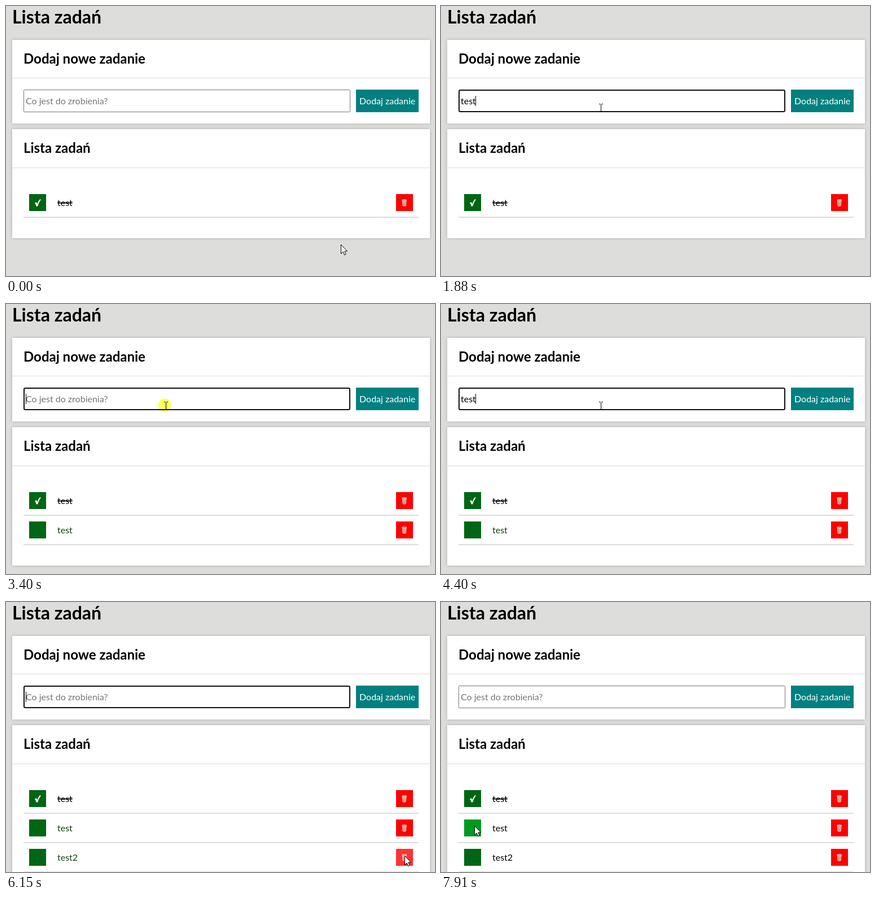
An HTML page that plays this animation: 760x478 px, repeating every 8 s.

```html
<!DOCTYPE html>
<html lang="pl">
<head>
<meta charset="utf-8">
<title>Lista zadań</title>
<style>
  html, body { margin: 0; width: 100%; height: 100%; overflow: hidden; background: #dddddc; }
  svg { display: block; width: 760px; height: 478px; font: 16px Lato, sans-serif; }
  .card { fill: #fff; filter: drop-shadow(0 0 2.5px #aaa); }
  .rule { fill: #ddd; }
  h1, .h1 { font-size: 32px; font-weight: 700; }
  .h2 { font-size: 24px; font-weight: 700; }
  .done { text-decoration: line-through; }
  #glow { mix-blend-mode: multiply; }
</style>
</head>
<body>
<svg viewBox="0 0 760 478">
  <defs>
    <path id="check" d="M51 348.6 L54.1 347.2 L55.3 350.2 Q57.3 344.8 60 342.3 L62 342.6 Q58.2 347.5 56.1 354.4 L53.7 354.6 Q52.7 350.8 51 348.6Z" fill="#fff"/>
    <g id="bin">
      <path d="M701.6 344 L709.6 344 L708.8 354 Q705.6 355.6 702.6 354Z" fill="#e3bcac"/>
      <ellipse cx="705.6" cy="343.6" rx="4.3" ry="1.5" fill="#f0d9c8"/>
      <path d="M702.8 343.7H708.4M704.1 346.5L704.5 353.5M707.2 346.5L706.8 353.5" stroke="#a85a4c" stroke-width=".8" fill="none"/>
    </g>
  </defs>
  <rect width="760" height="478" fill="#dddddc"/>
  <text class="h1" x="11" y="31">Lista zadań</text>
  <rect class="card" x="11" y="60" width="740" height="148"/>
  <text class="h2" x="31" y="102">Dodaj nowe zadanie</text>
  <rect class="rule" x="11" y="127" width="740" height="1"/>
  <rect id="field" fill="#fff"/>
  <text id="value" x="35" y="174"></text>
  <rect id="caret" y="159" width="1" height="18"/>
  <rect x="620" y="148" width="111" height="40" fill="#008080"/>
  <text x="626" y="174" fill="#fff">Dodaj zadanie</text>
  <rect id="list" class="card" x="11" y="218" width="740"/>
  <text class="h2" x="31" y="260">Lista zadań</text>
  <rect class="rule" x="11" y="286" width="740" height="1"/>
  <g id="rows"></g>
  <circle id="glow" r="11.5" fill="#ffff5c"/>
  <path id="arrow" d="M.5 .5V16.5L4.2 13L6.6 18.6L9.2 17.5L6.8 12H11.6Z" fill="#fff" stroke="#000"/>
  <path id="beam" d="M-3 -6.5H-.5M1.5 -6.5H4M.5 -6V6M-3 7.5H-.5M1.5 7.5H4M.5 6V7" fill="none" stroke="#000"/>
</svg>
<script>
const LOOP = 8000;
const $ = id => document.getElementById(id);
const set = (el, attrs) => { for (const k in attrs) el.setAttribute(k, attrs[k]); };
const show = (el, on) => set(el, { visibility: on ? 'visible' : 'hidden' });

// [start, x, y]: pointer position, held until the next step
const pointer = [
  [0, 593, 422], [130, 558, 380], [250, 430, 275], [370, 305, 192], [500, 283, 180],
  [5660, 345, 222], [5780, 550, 370], [5900, 672, 458], [6150, 706, 449],
  [6270, 426, 397], [6410, 260, 398], [6530, 150, 394], [6660, 88, 389],
  [6790, 71, 390], [6900, 59, 396]
];
// [start, typed text]
const typing = [
  [0, ''], [1500, 'te'], [1750, 'tes'], [1880, 'test'], [2260, ''],
  [3900, 't'], [4030, 'te'], [4150, 'tes'], [4400, 'test'], [4650, 'test2'], [5030, '']
];
const caretOff = [[1250, 1500], [2370, 2870], [5280, 5780], [6270, 6790]];
const clicks = [[500, 750], [3400, 3520], [7040, 7150], [7780, 7910]];
const tasks = [['test', 0], ['test', 2260], ['test2', 5030]];

const within = (t, spans) => spans.some(([a, b]) => t >= a && t < b);
const at = (t, steps) => steps.filter(s => s[0] <= t).pop();
const inside = (x, y, left, top, w, h) => x >= left && x < left + w && y >= top && y < top + h;

$('rows').innerHTML = tasks.map(([name], i) => `
  <g transform="translate(0 ${i * 52})">
    <rect class="box" x="41" y="333" width="30" height="30"/>
    <use class="tick" href="#check"/>
    <text class="name" x="91" y="354">${name}</text>
    <rect class="del" x="691" y="333" width="30" height="30"/>
    <use href="#bin"/>
    <rect class="rule" x="31" y="373" width="700" height="2"/>
  </g>`).join('');

const rows = [...$('rows').children].map(g => ({
  g, box: g.querySelector('.box'), tick: g.querySelector('.tick'),
  name: g.querySelector('.name'), del: g.querySelector('.del')
}));

function drawField(t) {
  const focus = t >= 500 && t < 7040;
  const text = at(t, typing)[1];
  const w = focus ? 2 : 1;
  set($('field'), {
    x: 31 + w / 2, y: 148 + w / 2, width: 579 - w, height: 40 - w,
    rx: focus ? 2 : 1, stroke: focus ? '#101010' : '#767676', 'stroke-width': w
  });
  $('value').textContent = text || 'Co jest do zrobienia?';
  set($('value'), { fill: text ? '#000' : '#757575' });
  const end = text ? Math.floor($('value').getComputedTextLength()) : 0;
  set($('caret'), { x: 35 + end });
  show($('caret'), focus && !within(t, caretOff));
}

function drawRows(t, x, y) {
  const count = tasks.filter(task => task[1] <= t).length;
  set($('list'), { height: 141 + 52 * count });
  rows.forEach((row, i) => {
    const top = 333 + 52 * i;
    const done = i === 0 || (i === 1 && t >= 7150 && t < 7910);
    row.g.style.display = i < count ? '' : 'none';
    set(row.box, { fill: inside(x, y, 41, top, 30, 30) ? '#009a20' : '#006614' });
    set(row.del, { fill: inside(x, y, 691, top, 30, 30) ? '#ff3333' : '#ff0000' });
    set(row.name, { class: done ? 'name done' : 'name', fill: i && t < 7040 ? '#123c12' : '#000' });
    row.tick.style.display = done ? '' : 'none';
  });
}

function drawPointer(t, x, y) {
  const typingCursor = inside(x, y, 31, 148, 579, 40);
  const move = `translate(${x} ${y})`;
  set($('arrow'), { transform: move });
  set($('beam'), { transform: move });
  show($('arrow'), !typingCursor);
  show($('beam'), typingCursor);
  set($('glow'), { cx: x - 2, cy: y - 1 });
  show($('glow'), within(t, clicks));
}

function draw(t) {
  const [, x, y] = at(t, pointer);
  drawField(t);
  drawRows(t, x, y);
  drawPointer(t, x, y);
}

function tick() {
  draw(performance.now() % LOOP);
  requestAnimationFrame(tick);
}
tick();
</script>
</body>
</html>
```
